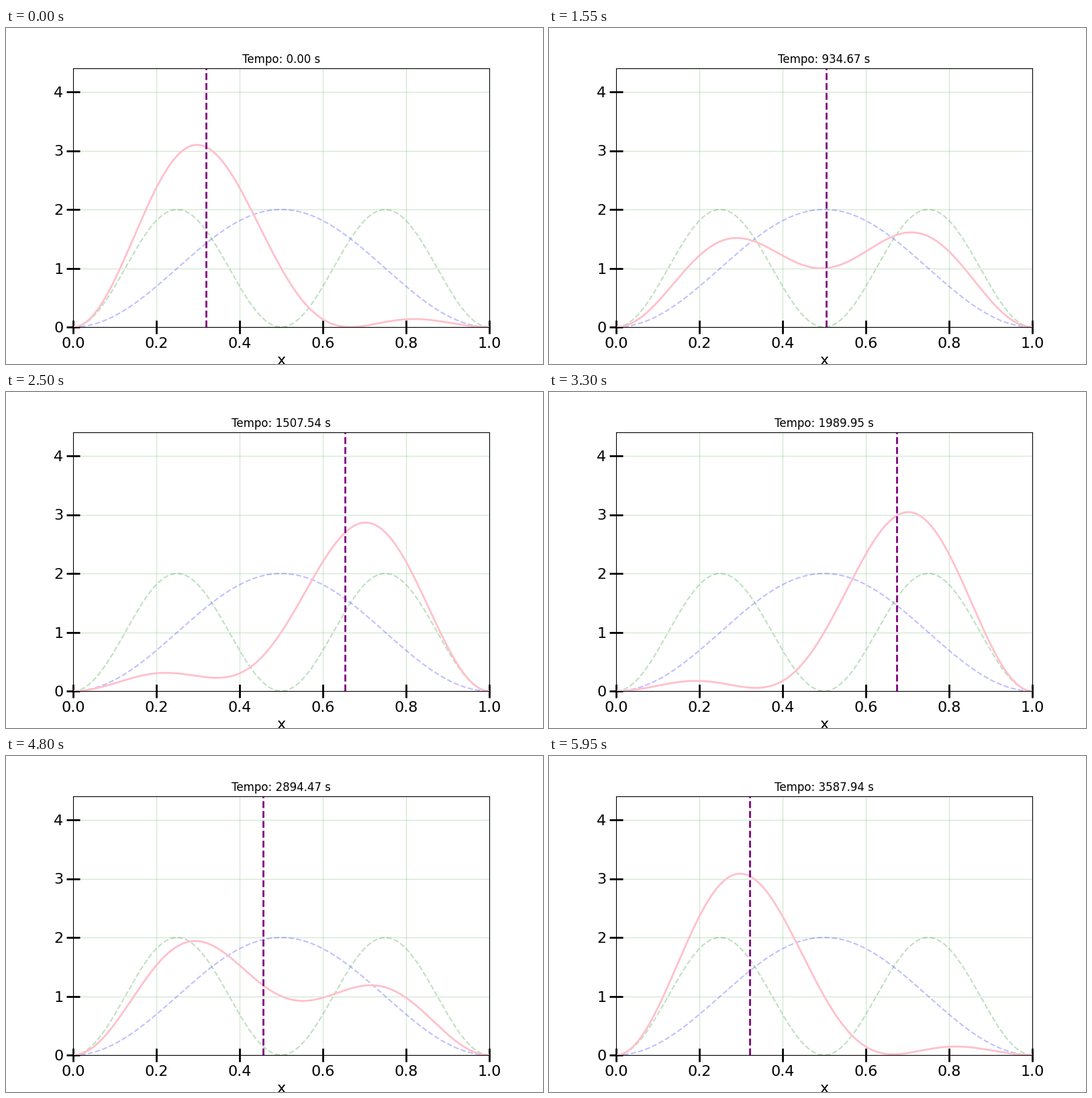
A matplotlib script that plays this animation: 800 by 500 pixels, repeating every 6 s.

```python
import numpy as np
import matplotlib.pyplot as plt
from matplotlib.animation import FuncAnimation

FRAMES = 120
STEP = 6000 / 199                        # simulated seconds per frame
HBAR, MASS = 1.054571817e-34, 9.1093837e-31
OMEGA = 1.5 * np.pi**2 * HBAR / MASS     # (E2 - E1) / hbar for a box of width 1

x = np.linspace(0, 1, 1000)
psi1 = np.sqrt(2) * np.sin(np.pi * x)
psi2 = np.sqrt(2) * np.sin(2 * np.pi * x)

plt.rcParams["font.family"] = "DejaVu Sans"
fig, ax = plt.subplots(figsize=(8, 5), dpi=100)
ax.set_xlim(0, 1)
ax.set_ylim(0, 4.4)
ax.set_yticks(range(5))
ax.set_xlabel("x", fontsize=16)
ax.tick_params(direction="inout", length=14, width=2, labelsize=16)
ax.grid(color="green", alpha=0.2)

ax.plot(x, psi1**2, "--", color="blue", alpha=0.25, lw=1.5)
ax.plot(x, psi2**2, "--", color="green", alpha=0.25, lw=1.5)
density, = ax.plot([], [], color="pink", lw=2)
mean = ax.axvline(0.5, color="purple", ls="--", lw=2)
title = ax.set_title("", fontsize=12)


def update(i):
    t = i * STEP
    c = np.cos(OMEGA * t)
    density.set_data(x, (psi1**2 + psi2**2) / 2 + psi1 * psi2 * c)
    pos = 0.5 - 16 / (9 * np.pi**2) * c
    mean.set_xdata([pos, pos])
    title.set_text(f"Tempo: {t:.2f} s")
    return density, mean, title


anim = FuncAnimation(fig, update, frames=FRAMES, interval=50,
                     repeat=True, repeat_delay=0, blit=False)
plt.show()
```
